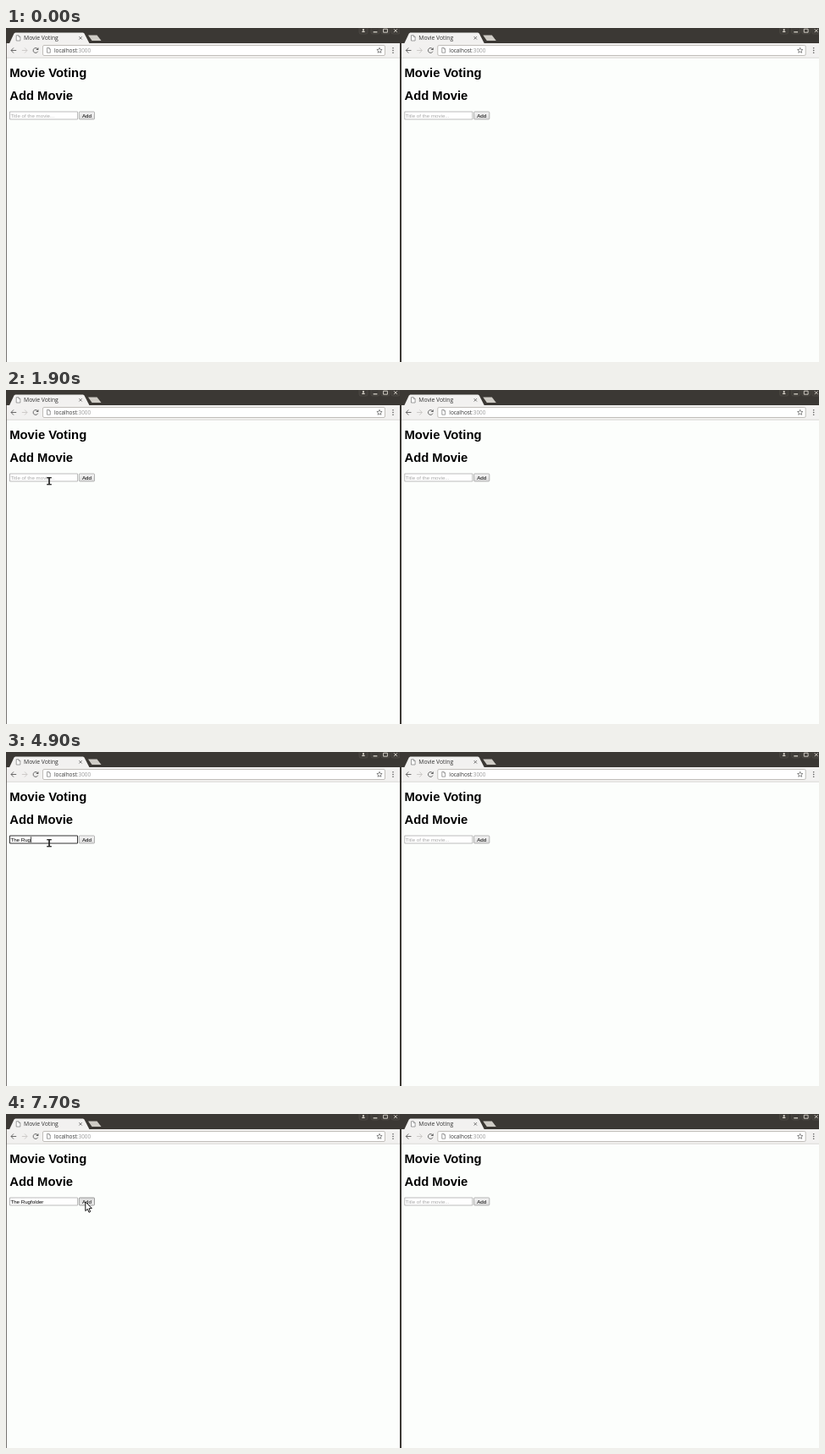
Write an HTML page with a canvas that moves like this. It is 960x395 px and loops after 8 s.

```html
<!DOCTYPE html>
<html lang="en">
<head>
<meta charset="utf-8">
<title>Movie Voting</title>
<style>
  html, body { margin: 0; width: 100%; height: 100%; overflow: hidden; background: #fcfefc; }
  canvas { display: block; }
</style>
</head>
<body>
<canvas id="stage" width="960" height="395"></canvas>
<script>
const c = document.getElementById('stage').getContext('2d');
const LOOP = 8000;
const DARK = '#3b3834', BAR = '#f2f1f0', PAGE = '#fcfefc', ICON = '#5c5c5c';
const SANS = '"Liberation Sans", Arial, sans-serif';
const UI = '"Open Sans", "Noto Sans", sans-serif';
const FIELD = '6.17px ' + SANS;
const TITLE = 'The Rugfolder';

// [start ms, value]
const typed = [[0, 0], [3400, 1], [3800, 3], [4000, 4], [4400, 5], [4700, 6], [4900, 7],
  [5200, 8], [5300, 9], [5600, 10], [5800, 11], [5900, 12], [6200, 13]];
const caret = [[0, false], [2200, true], [2800, false], [3400, true], [6800, false],
  [7300, true], [7700, false]];
const pointer = [[0, null], [600, [arrow, 492, 195]], [700, [arrow, 361, 193]],
  [1000, [arrow, 346.5, 194]], [1100, [arrow, 289, 185]], [1300, [arrow, 200, 155]],
  [1400, [arrow, 125, 126]], [1600, [beam, 58.5, 110]], [1800, [beam, 54, 108.5]],
  [1900, [beam, 51, 107.7]], [7000, [beam, 62, 107]], [7100, [arrow, 84.5, 103]],
  [7300, [arrow, 91, 104]], [7400, [arrow, 93.8, 104]]];

const at = (steps, t) => steps.filter(s => s[0] <= t).pop()[1];

function rect(x, y, w, h, fill) {
  c.fillStyle = fill;
  c.fillRect(x, y, w, h);
}

function box(x, y, w, h, r, fill, stroke, width = 1) {
  c.beginPath();
  c.roundRect(x, y, w, h, r);
  paint(fill, stroke, width);
}

function paint(fill, stroke, width = 1) {
  if (fill) { c.fillStyle = fill; c.fill(); }
  if (stroke) { c.strokeStyle = stroke; c.lineWidth = width; c.stroke(); }
}

function shape(points, fill, stroke, width, open) {
  c.beginPath();
  points.forEach(([x, y]) => c.lineTo(x, y));
  if (!open) c.closePath();
  paint(fill, stroke, width);
}

const line = (points, color, width = 1) => shape(points, null, color, width, true);

function text(s, x, y, font, color) {
  c.font = font;
  c.fillStyle = color;
  c.fillText(s, x, y);
  return c.measureText(s).width;
}

function cross(x, y, r, color) {
  line([[x - r, y - r], [x + r, y + r]], color, 0.9);
  line([[x + r, y - r], [x - r, y + r]], color, 0.9);
}

function sheet(x, y, w, h) {
  shape([[x, y], [x + w * 0.6, y], [x + w, y + w * 0.4], [x + w, y + h], [x, y + h]], '#fff', '#777', 0.7);
  line([[x + w * 0.6, y], [x + w * 0.6, y + w * 0.4], [x + w, y + w * 0.4]], '#777', 0.6);
}

function backArrow(x, dir, color) {
  line([[x - 3 * dir, 26.5], [x + 3.2 * dir, 26.5]], color, 0.9);
  line([[x, 23.4], [x - 3 * dir, 26.5], [x, 29.6]], color, 0.9);
}

function star(x, y) {
  const points = [];
  for (let i = 0; i < 10; i++) {
    const r = i % 2 ? 1.5 : 3.3, a = i * Math.PI / 5 - Math.PI / 2;
    points.push([x + r * Math.cos(a), y + r * Math.sin(a)]);
  }
  shape(points, null, ICON, 0.7);
}

// Window buttons, star and menu sit relative to the right edge.
function rightSide(dx) {
  c.save();
  c.translate(dx, 0);
  for (const x of [422, 436, 448, 460]) box(x - 5, -3, 10, 10, 2, '#403d39', '#55514b', 0.6);
  c.beginPath();
  c.arc(422, 2, 1.1, 0, 7);
  paint('#dfdbd2');
  shape([[420, 5], [421, 3.4], [423, 3.4], [424, 5]], '#dfdbd2');
  rect(433.6, 4.2, 4.8, 1.2, '#dfdbd2');
  box(445.6, 1.2, 4.8, 4, 0, null, '#dfdbd2', 0.9);
  cross(460, 3.2, 1.9, '#dfdbd2');
  star(441, 26.6);
  for (const y of [23.7, 26.5, 29.3]) {
    c.beginPath();
    c.arc(457, y, 0.8, 0, 7);
    paint(ICON);
  }
  c.restore();
}

function browser(x, width, dx, form) {
  rect(x, 0, width, 18, DARK);
  rect(x, 18, width, 17, BAR);
  rect(x, 35, width, 360, PAGE);
  rect(x, 34.8, width, 0.8, '#d2d0ce');
  box(x + 43.5, 20.5, 404 + dx - x, 12, 1.5, '#fff', '#bab7b3', 0.9);
  rightSide(dx);

  c.save();
  c.translate(x, 0);
  shape([[97, 8.6], [107.5, 8.6], [112.5, 15], [101.5, 15]], '#cfccc6');
  shape([[4, 18.2], [9.5, 6.5], [11, 5.5], [91, 5.5], [92.5, 6.5], [98.5, 18.2]], BAR);
  sheet(12.2, 8.7, 4.6, 6.3);
  text('Movie Voting', 21, 14.1, '6.8px ' + UI, '#333');
  cross(88, 11.8, 1.7, '#666');
  backArrow(9, 1, ICON);
  backArrow(22, -1, '#c9c7c5');
  c.beginPath();
  c.arc(35, 26.5, 2.9, 0.4, 5.5);
  paint(null, ICON, 0.9);
  shape([[38.4, 22.9], [38.4, 26], [35.3, 26]], ICON);
  sheet(48.5, 23.4, 3.8, 5.8);
  const host = text('localhost', 57, 28.6, '6.4px ' + UI, '#333');
  text(':3000', 57 + host, 28.6, '6.4px ' + UI, '#999');

  text('Movie Voting', 4.2, 58.3, 'bold 14.8px ' + SANS, '#000');
  text('Add Movie', 4.2, 85.4, 'bold 14.8px ' + SANS, '#000');

  box(4.5, 99, 80, 9, 0, '#fff', form.focus ? '#333' : '#aaa', form.focus ? 1 : 0.8);
  const w = form.value
    ? text(form.value, 5.4, 105.8, FIELD, '#000')
    : (text('Title of the movie...', 5.4, 105.8, FIELD, '#a9a9a9'), 0);
  if (form.caret) rect(5.5 + w, 100.2, 0.7, 6.8, '#000');

  const g = c.createLinearGradient(0, 99, 0, 108);
  g.addColorStop(0, form.press ? '#dcdcdc' : '#f4f4f4');
  g.addColorStop(1, form.press ? '#eaeaea' : '#dddddd');
  box(86.3, 99, 18.2, 9, 1, g, form.hover ? '#888' : '#a2a2a2', 0.8);
  text('Add', 89.9, 105.8, FIELD, '#000');
  c.restore();
}

function arrow(x, y) {
  shape([[0, 0], [0, 10.6], [2.5, 8.4], [4.2, 12.3], [5.9, 11.5], [4.2, 7.8], [7.5, 7.5]]
    .map(p => [x + p[0], y + p[1]]), '#fff', '#111', 1);
}

function beam(x, y) {
  line([[x, y - 4], [x, y + 4]], '#222', 1.7);
  for (const s of [-4, 4]) line([[x - 2.8, y + s], [x + 2.8, y + s]], '#222', 1.3);
}

function draw(now) {
  const t = now % LOOP;
  browser(466.3, 494, 496.7, {});
  browser(0, 465, 0, {
    value: TITLE.slice(0, at(typed, t)),
    caret: at(caret, t),
    focus: t >= 2200 && t < 7700,
    hover: t >= 7300,
    press: t >= 7700
  });
  rect(0, 18, 0.8, 377, '#55524e');
  rect(465, 0, 2, 395, DARK);
  const p = at(pointer, t);
  if (p) p[0](p[1], p[2]);
}

const start = performance.now();
function tick() {
  draw(performance.now() - start);
  requestAnimationFrame(tick);
}
tick();
</script>
</body>
</html>
```
